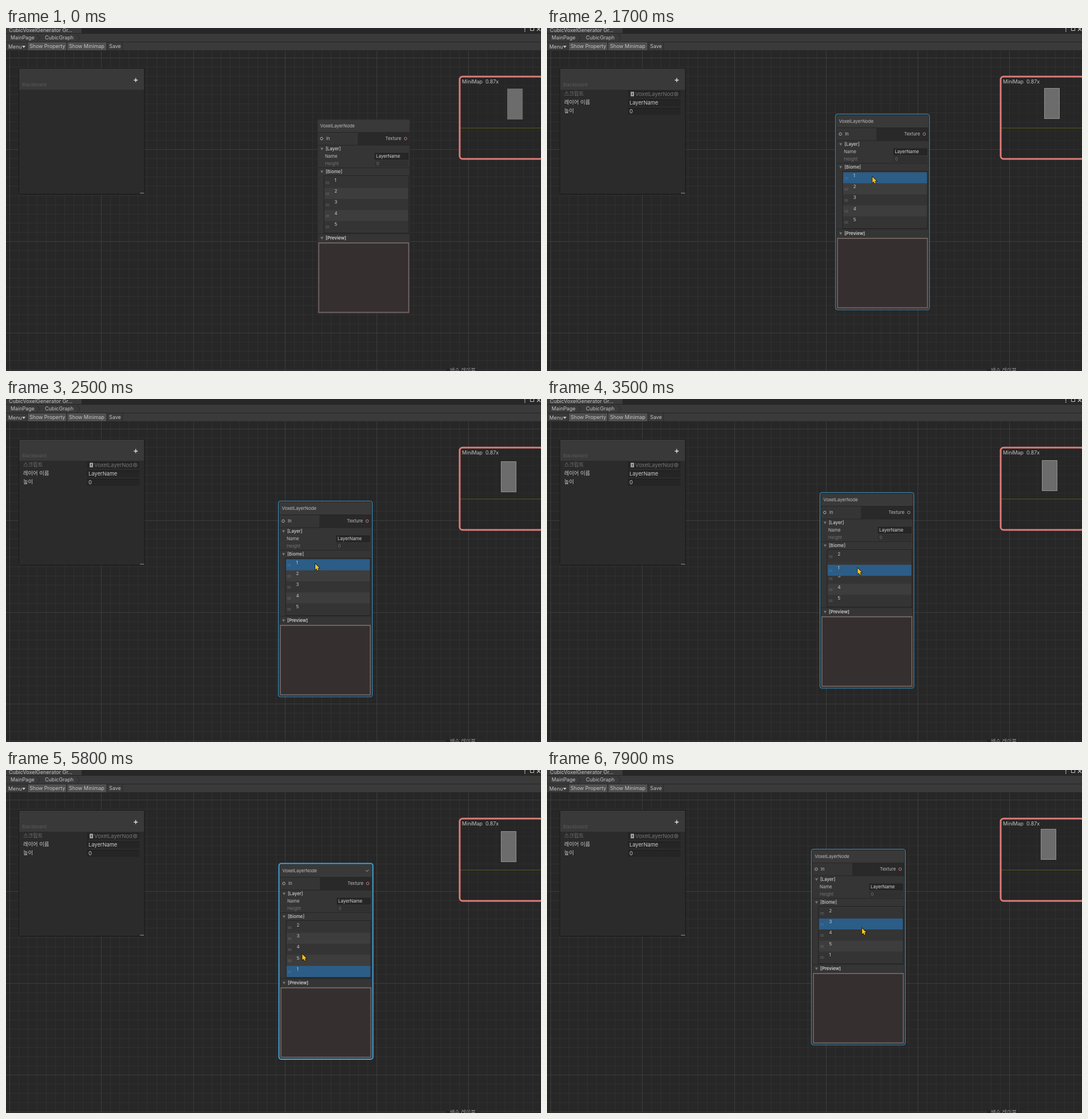
These frames come from a looping animation (934x600 px, 8 s). An HTML page with a canvas:

```html
<!DOCTYPE html>
<html lang="en">
<head>
<meta charset="utf-8">
<title>Voxel graph editor</title>
<style>
  html, body { margin: 0; width: 100%; height: 100%; overflow: hidden; background: #272727; }
  canvas { display: block; }
</style>
</head>
<body>
<canvas id="stage" width="934" height="600"></canvas>
<script>
const ctx = document.getElementById('stage').getContext('2d');
const LOOP = 8000, STEP = 100, SELECT_AT = 900;
const NODE_DRAG = { from: 1100, to: 2800, grip: { x: 63, y: 107.5 } };
const LIST_DRAG = { from: 2800, to: 5100 };
const NODE_DRAG_AGAIN = { from: 7400, to: LOOP, grip: { x: 87, y: 136 } };
const ROW = 19.3, LIST_TOP = 100.5, NODE_W = 161, NODE_H = 339;

// Turning points as [time, x, y]
const nodePath = [
  [1100, 544, 160], [1200, 514, 169], [1500, 492, 178], [2000, 525, 113], [2200, 553, 140],
  [2400, 510, 197], [2500, 477, 180], [2800, 478, 165], [7400, 478, 165], [7900, 463, 140]
];
const cursorPath = [
  [100, 917, 103], [600, 607, 267.5], [3200, 541, 272.5], [4100, 545, 340], [4500, 545, 340],
  [4900, 603, 320], [5100, 744, 340], [5400, 515, 326], [5700, 512, 324], [6600, 560, 300],
  [7000, 916, 78], [7400, 565, 301]
];

const during = (span, t) => t >= span.from && t < span.to;

function along(path, t) {
  const i = path.findIndex(p => p[0] > t);
  const [t0, x0, y0] = path.at(i < 0 ? -1 : Math.max(i - 1, 0));
  const [t1, x1, y1] = path.at(i);
  const k = t1 === t0 ? 0 : (t - t0) / (t1 - t0);
  return { x: x0 + (x1 - x0) * k, y: y0 + (y1 - y0) * k };
}

function cursorAt(t, node) {
  const drag = [NODE_DRAG, NODE_DRAG_AGAIN].find(span => during(span, t));
  if (drag) return { x: node.x + drag.grip.x, y: node.y + drag.grip.y };
  if (t >= 600 && t < NODE_DRAG.from) return along(cursorPath, 600);
  if (t >= NODE_DRAG.to && t < 3200) return along(cursorPath, 3200);
  return along(cursorPath, t);
}

function box(x, y, w, h, fill) {
  ctx.fillStyle = fill;
  ctx.fillRect(x, y, w, h);
}

function frame(x, y, w, h, color, width = 1, radius = 0) {
  ctx.strokeStyle = color;
  ctx.lineWidth = width;
  ctx.beginPath();
  ctx.roundRect(x, y, w, h, radius);
  ctx.stroke();
}

function shape(points, color, { close = false, stroke = 0 } = {}) {
  ctx.beginPath();
  points.forEach(([x, y]) => ctx.lineTo(x, y));
  if (close) ctx.closePath();
  if (stroke) {
    ctx.strokeStyle = color;
    ctx.lineWidth = stroke;
    ctx.stroke();
  } else {
    ctx.fillStyle = color;
    ctx.fill();
  }
}

function ring(x, y, r, color) {
  ctx.strokeStyle = color;
  ctx.lineWidth = 1;
  ctx.beginPath();
  ctx.arc(x, y, r, 0, Math.PI * 2);
  ctx.stroke();
}

// y is the middle of the capital letters
function label(text, x, y, { size = 8.9, color = '#c4c4c4', weight = 400, align = 'left' } = {}) {
  ctx.font = `${weight} ${size}px Inter, "Noto Sans CJK KR", "Noto Sans CJK", sans-serif`;
  ctx.fillStyle = color;
  ctx.textAlign = align;
  ctx.fillText(text, x, y + size * 0.36);
}

function drawGrid() {
  box(0, 0, 934, 600, '#272727');
  const gap = 16.02;
  for (const major of [false, true]) {
    const color = major ? '#3d3d3d' : '#303030';
    for (let i = 0; i < 59; i++) {
      if ((i % 10 === 0) !== major) continue;
      box(Math.round(6.2 + i * gap), 40, 1, 560, color);
      box(0, Math.round(52.2 + i * gap), 934, 1, color);
    }
  }
  box(0, 598, 768, 1, '#353535');
  box(768, 597, 54, 3, '#222');
  label('배수 레이블', 775, 598.5, { size: 9.2, color: '#999' });
}

function drawHeader() {
  const icon = '#c4c4c4';
  box(0, 0, 934, 10, '#272727');
  box(0, 0, 132, 10, '#3b3b3b');
  label('CubicVoxelGenerator Gr...', 5, 3.5, { size: 9.1 });
  for (const y of [0, 2.5, 5]) box(905, y, 1.5, 1.5, icon);
  frame(915.5, -0.5, 6, 5, icon);
  for (const side of [-3, 3]) shape([[930 - side, -1], [930 + side, 5]], icon, { stroke: 1.2 });

  box(0, 10, 934, 30, '#3a3a3a');
  for (const y of [9, 24, 39]) box(0, y, 934, 1, '#252525');
  label('MainPage', 8, 17);
  label('CubicGraph', 68, 17);
  for (const x of [54, 124]) shape([[x, 11], [x + 5, 17.5], [x, 24]], '#282828', { stroke: 1 });

  box(38, 25, 67, 14, '#505050');
  box(107, 25, 68, 14, '#505050');
  for (const x of [37, 106, 176, 203]) box(x, 25, 1, 14, '#2a2a2a');
  label('Menu', 4, 33);
  shape([[28, 31], [34, 31], [31, 35]], icon);
  label('Show Property', 41, 31.5);
  label('Show Minimap', 110, 31.5);
  label('Save', 180, 31.5);
}

function drawBlackboard(filled) {
  box(23, 71, 218, 219, '#2b2b2b');
  box(23, 71, 218, 37, '#393939');
  frame(22.5, 70.5, 219, 220, '#1a1a1a', 1, 2);
  label('Blackboard', 28, 99, { size: 8, color: '#5a5a5a' });
  box(223, 90.5, 7, 1.4, '#e4e4e4');
  box(225.8, 87.5, 1.4, 7, '#e4e4e4');
  box(234, 288.5, 7, 1, '#a0a0a0');
  if (!filled) return;

  const fields = [['스크립트', 'VoxelLayerNod'], ['레이어 이름', 'LayerName'], ['높이', '0']];
  fields.forEach(([caption, value], i) => {
    const y = 115 + i * 15, locked = i === 0;
    const style = { size: 9.3, color: locked ? '#757575' : '#cacaca' };
    box(141, y - 5, 92, 12, '#252525');
    box(141, y - 5, 92, 1, '#1b1b1b');
    label(caption, 30, y, style);
    label(value, locked ? 154 : 144, y + 0.8, style);
  });
  box(146, 111.5, 6, 8, '#a0a0a0');
  box(148, 114, 2, 3, '#555');
  ring(225.5, 115.5, 3.2, '#777');
  box(224.5, 114.5, 2, 2, '#888');
}

function drawMinimap(node, selected) {
  box(792, 85, 142, 144, 'rgba(38, 38, 38, 0.5)');
  box(793, 174.5, 141, 1, '#5c5c1a');
  const x = Math.round(874.5 + (node.x - 544) * 0.155);
  const y = Math.round(106 + (node.y - 160) * 0.16);
  box(x, y, 27, 54, '#6c6c6c');
  if (selected) frame(x + 0.5, y + 0.5, 26, 53, '#909090');
  frame(792, 85, 145, 144, '#dd7c78', 3, 5);
  label('MiniMap  0.87x', 796, 94);
}

function foldout(text, y, weight = 500) {
  shape([[5, y - 2], [10, y - 2], [7.5, y + 2.5]], '#777');
  label(text, 14, y, { size: 7.8, color: '#d0d0d0', weight });
}

function drawRow(item, y, selected, slot) {
  box(11.5, y, 147, ROW, selected ? '#2c5d87' : slot % 2 ? '#3d3d3d' : '#343434');
  for (const dy of [8.5, 11]) box(14, y + dy, 6.5, 1, selected ? '#44729a' : '#606060');
  label(item, 29.5, y + 5.4, { size: 7.8, color: '#d0d0d0' });
}

function drawList(t, node, cursor) {
  const order = [1, 2, 3, 4, 5];
  const selected = t < NODE_DRAG.from ? 0 : t < NODE_DRAG_AGAIN.from ? 1 : 3;
  const dragging = during(LIST_DRAG, t);
  const pulled = Math.max(0, Math.min(4 * ROW, cursor.y - 5 - node.y - LIST_TOP));
  const target = dragging ? Math.round(pulled / ROW) : t < LIST_DRAG.to ? 0 : 4;
  order.splice(target, 0, order.shift());

  box(11, 98, 148, 100.5, '#373737');
  order.forEach((item, slot) => {
    if (!dragging || item !== 1) drawRow(item, LIST_TOP + slot * ROW, item === selected, slot);
  });
  if (dragging) drawRow(1, LIST_TOP + pulled, true, target);
  frame(11, 98.5, 148, 100, '#222');
}

function drawNode(t, node, cursor, selected, hovered) {
  const text = { size: 7.8, color: '#bcbcbc' }, dim = { size: 7.8, color: '#727272' };
  ctx.save();
  ctx.translate(node.x, node.y);
  box(-0.5, -0.5, NODE_W + 1, NODE_H + 1, '#353535');
  box(0, 0, NODE_W, 22, '#393939');
  box(70, 22, NODE_W - 70, 23, '#292929');
  for (const y of [22, 44.5, 84, 199.5]) box(0, y, NODE_W, 1, '#262626');
  frame(0, 0, NODE_W, NODE_H, '#2a2a2a', 1, 2);

  label('VoxelLayerNode', 4.5, 11, text);
  if (hovered) shape([[150, 10], [152.5, 12.5], [155, 10]], '#b0b0b0', { stroke: 1 });
  ring(7, 33.5, 2.3, '#b4b4b4');
  label('In', 15, 33.5, text);
  label('Texture', 146, 33.5, { ...text, align: 'right' });
  ring(153.5, 33.5, 2.3, '#d07e7d');

  foldout('[Layer]', 51.5);
  label('Name', 13, 64.3, text);
  box(100, 59, 58, 11, '#262626');
  frame(100, 59, 58, 11, '#1e1e1e', 0.7);
  label('LayerName', 102, 64.3, { ...text, color: '#d4d4d4' });
  label('Height', 13, 77, dim);
  box(100, 72, 58, 10.5, '#303030');
  label('0', 102.5, 77, dim);

  foldout('[Biome]', 91.5);
  drawList(t, node, cursor);

  foldout('[Preview]', 207.5, 600);
  box(2, 216, 157, 122, '#362f2f');
  frame(2, 216, 157, 121.5, '#6e6261', 1.8);

  if (selected || hovered) {
    const thick = selected && hovered;
    frame(-1.5, -1.5, NODE_W + 3, NODE_H + 3.5, thick ? '#42a2da' : '#398ebd', thick ? 2 : 1.1, 4);
  }
  ctx.restore();
}

function drawCursor({ x, y }) {
  const outline = [[0, 0], [0, 10], [2.3, 8], [3.8, 11.5], [5.6, 10.6], [4.2, 7.3], [7.2, 7.1]]
    .map(([dx, dy]) => [x + dx, y + dy + 1]);
  shape(outline, '#1c1a14', { close: true, stroke: 1.6 });
  shape(outline, '#f7c520', { close: true });
}

function draw(t) {
  const node = along(nodePath, t), cursor = cursorAt(t, node);
  const selected = t >= SELECT_AT, visible = t >= STEP;
  const pressed = [NODE_DRAG, LIST_DRAG, NODE_DRAG_AGAIN].some(span => during(span, t));
  const inside = cursor.x > node.x && cursor.x < node.x + NODE_W &&
                 cursor.y > node.y && cursor.y < node.y + NODE_H;
  drawGrid();
  drawNode(t, node, cursor, selected, visible && inside && !pressed);
  drawBlackboard(selected);
  drawMinimap(node, selected);
  drawHeader();
  if (visible) drawCursor(cursor);
}

const start = performance.now();
function tick() {
  const t = (performance.now() - start) % LOOP;
  draw(Math.floor(t / STEP) * STEP);
  requestAnimationFrame(tick);
}
tick();
</script>
</body>
</html>
```
